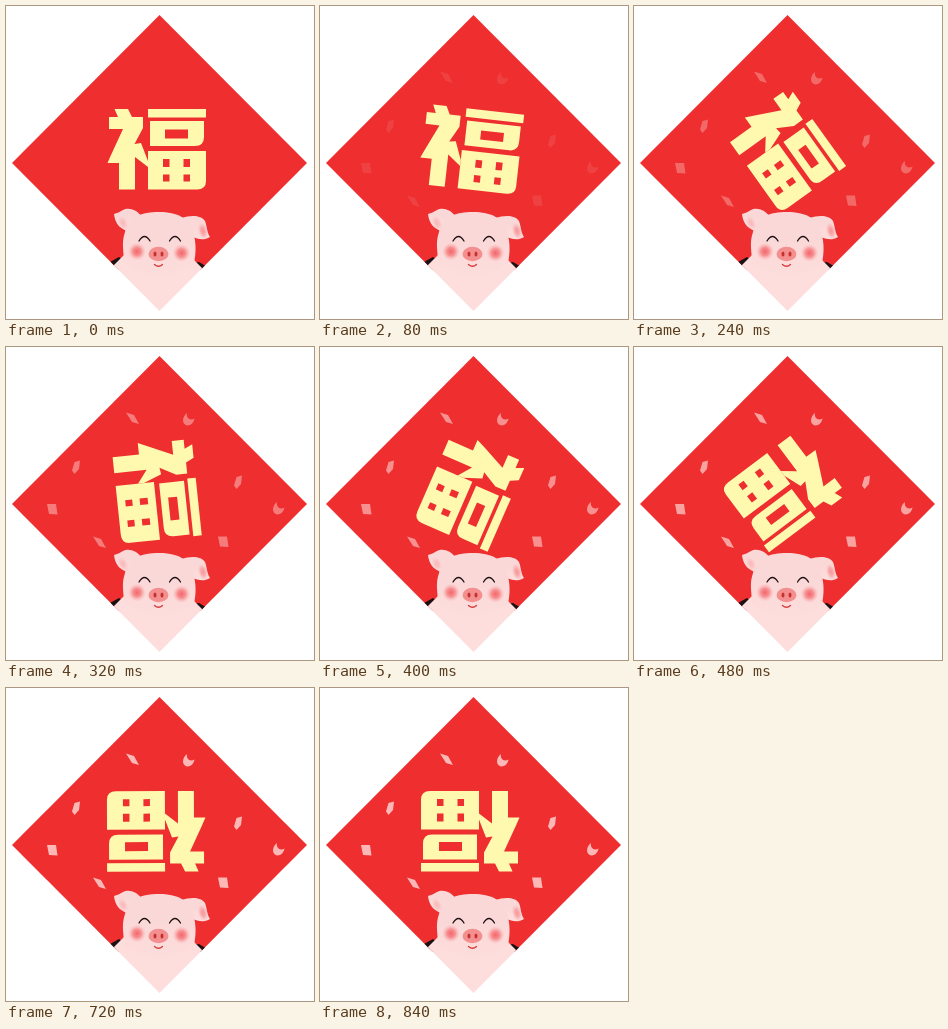
An HTML page for the animation above (2 s loop, 308 px wide and 313 px high).

```html
<!DOCTYPE html>
<html lang="zh">
<head>
<meta charset="utf-8">
<title>福</title>
<style>
html, body { margin: 0; width: 100%; height: 100%; overflow: hidden; background: #fff; }
svg { display: block; width: 308px; height: 313px; }
</style>
</head>
<body>
<svg viewBox="0 0 308 313">
  <defs>
    <clipPath id="diamond"><path d="M153.5 9L301 157L153.5 305L6 157Z"/></clipPath>
    <radialGradient id="blush">
      <stop offset="0" stop-color="#f4666a"/>
      <stop offset=".45" stop-color="#f57b7e" stop-opacity=".8"/>
      <stop offset="1" stop-color="#f9b0b0" stop-opacity="0"/>
    </radialGradient>
    <linearGradient id="skin" x2="0" y2="1">
      <stop offset=".4" stop-color="#fbd8d8"/>
      <stop offset="1" stop-color="#fddedd"/>
    </linearGradient>
    <path id="shard" d="M120 65.500L128 68L133 77L126 75Z"/>
    <path id="moon" d="M181 66C180 71 184 74 188.500 71.500C187 80 178 80.500 177 74C177 71 178 68 181 66Z"/>
    <path id="flake" d="M68.500 115L74 113.500L73 122L68.500 127L66 123.500Z"/>
    <path id="tile" d="M41 157H50L51.500 167.500L43 167Z"/>
  </defs>

  <g clip-path="url(#diamond)">
    <path fill="#ee2e2f" d="M0 0H308V264H0Z"/>

    <g id="confetti" fill="#fbb8b6">
      <use href="#shard"/><use href="#shard" x="-33" y="124"/>
      <use href="#moon"/><use href="#moon" x="90" y="89"/>
      <use href="#flake"/><use href="#flake" x="162" y="15"/>
      <use href="#tile"/><use href="#tile" x="171" y="32.500"/>
    </g>

    <g id="fu" fill="#fff8af" fill-rule="evenodd">
      <path d="M108.500 103H122L126 111H137V122L128.500 138L135 137L142 155V161L129 151V183.500H113V157H101.500L105 149L117 123H103V111H112Z"/>
      <path d="M142 103H200V111.500H142Z"/>
      <path d="M144 115H198V131Q198 140 189 140H144ZM159 123.500V132.500H182V123.500Z"/>
      <path d="M142 145H200V175Q200 183.500 191 183.500H142ZM157 153V161H163.500V153ZM177.500 153V161H184V153ZM157 168.500V175.500H163.500V168.500ZM177.500 168.500V175.500H184V168.500Z"/>
    </g>

    <!-- pig -->
    <path fill="#1d1113" d="M104 256L113 251L118 255L108 263ZM203 262L193 256L188 257L198 267Z"/>
    <path fill="#fddedd" d="M118 249L105 262V313H202V268L188 254Z"/>
    <g fill="url(#skin)">
      <path d="M136 211C131 203 122 201 117 204C114 206 111 207 108 208C109 217 113 222 121 225Z"/>
      <path d="M175 212C185 209 195 209 199 215C201 220 201 227 204 231C198 235 191 233 187 231Z"/>
      <path d="M153 206C171 206 185 212 188 229C191 242 189 251 188 258L153 275L118 258C118 244 115 238 119 226C122 211 136 206 153 206Z"/>
    </g>
    <ellipse cx="117" cy="217" rx="5" ry="8" fill="url(#blush)" opacity=".3" transform="rotate(-25 117 217)"/>
    <ellipse cx="197" cy="225" rx="5" ry="9" fill="url(#blush)" opacity=".6" transform="rotate(-15 197 225)"/>
    <circle cx="131" cy="245.500" r="9" fill="url(#blush)"/>
    <circle cx="175.500" cy="247" r="9" fill="url(#blush)"/>
    <ellipse cx="152.500" cy="248" rx="10" ry="7.200" fill="#f38f8e"/>
    <g fill="#c5312f">
      <ellipse cx="149" cy="248" rx="1.500" ry="2.600"/>
      <ellipse cx="156" cy="248" rx="1.500" ry="2.600"/>
    </g>
    <g fill="none" stroke-linecap="round">
      <path stroke="#1d1113" stroke-width="1.300" d="M133 235Q138.500 226 144 235M163.500 235Q169 226 174.500 235"/>
      <path stroke="#d83a3a" stroke-width="1.300" d="M148.500 258.500Q152.500 262 156.500 258.500"/>
    </g>
  </g>
</svg>
<script>
const LOOP = 2000, STEP = 40, END = 840;
const SPEED = 0.37, RAMP = 186, BRAKE = 540;
const REST = 180 - SPEED * (BRAKE - RAMP / 2);
const fu = document.getElementById('fu');
const confetti = document.getElementById('confetti');

// Speeds up, turns evenly, then settles at half a turn.
function angle(t) {
  if (t < RAMP) return SPEED * t * t / (2 * RAMP);
  if (t < BRAKE) return SPEED * (t - RAMP / 2);
  return 180 - REST * Math.exp((BRAKE - t) * SPEED / REST);
}

function draw(now) {
  const t = Math.min(Math.floor(now % LOOP / STEP) * STEP, END);
  fu.setAttribute('transform', `rotate(${angle(t)} 150.5 143.3)`);
  confetti.setAttribute('opacity', Math.min(t / 560, 1));
  requestAnimationFrame(draw);
}
draw(0);
</script>
</body>
</html>
```
